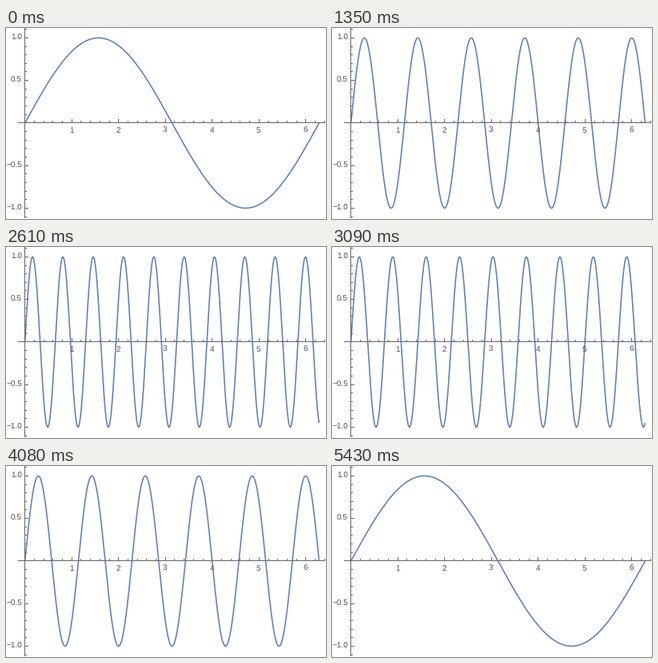
A matplotlib script for the animation above (5.46 s loop, 400 by 239 pixels).

```python
import matplotlib.pyplot as plt
import numpy as np
from matplotlib.animation import FuncAnimation

W, H, DPI = 400, 239, 64
PX = 72 / DPI                 # points per pixel
X0, Y0 = 23.7, 118.9          # origin in pixels
SX, SY = 58.52, 106.5         # pixels per unit
FRAMES, INTERVAL = 182, 30
GRAY, BLUE = "#666666", "#5e81b5"

plt.rcParams["font.family"] = "Liberation Sans"
plt.rcParams["text.hinting"] = "none"

fig = plt.figure(figsize=(W / DPI, H / DPI), dpi=DPI, facecolor="white")
ax = fig.add_axes([0, 0, 1, 1])
ax.set_xlim(0, W)
ax.set_ylim(H, 0)
ax.axis("off")


def center(v):
    """Middle of the pixel that holds v."""
    return np.floor(v) + 0.5


def segment(x1, y1, x2, y2):
    ax.plot([x1, x2], [y1, y2], color=GRAY, lw=PX, zorder=3,
            solid_capstyle="butt", snap=False)


def label(x, y, text, ha):
    ax.text(x, y, text, fontsize=10 * PX, color="#505050", ha=ha,
            va="baseline", zorder=4)


def draw_axes():
    ox, oy = center(X0), center(Y0)
    segment(15, oy, 399, oy)
    segment(ox, 0, ox, 238)

    for k in range(1, 33):
        x = X0 + 0.2 * k * SX
        major = k % 5 == 0
        segment(center(x), oy, center(x), oy - (4.5 if major else 2.5))
        if major:
            label(x - 0.7, 130.8, str(k // 5), "center")

    for k in range(-11, 12):
        if k == 0:
            continue
        y = center(Y0 - 0.1 * k * SY)
        major = k % 5 == 0
        segment(ox, y, ox + (4.5 if major else 2.5), y)
        if major:
            text = f"{k / 10:.1f}".replace("-", "\u2212")
            label(20, y + 2.5, text, "right")


draw_axes()
t = np.linspace(0, 2 * np.pi, 1500)
curve, = ax.plot([], [], color=BLUE, lw=1.6 * PX, zorder=2,
                 solid_capstyle="butt", solid_joinstyle="round")


def update(i):
    # frequency climbs from 1 to 10, then falls back
    freq = 1 + 0.1 * min(i, FRAMES - 1 - i)
    curve.set_data(X0 + SX * t, Y0 - SY * np.sin(freq * t))
    return curve,


anim = FuncAnimation(fig, update, frames=FRAMES, interval=INTERVAL,
                     repeat=True, repeat_delay=0, blit=False)
plt.show()
```
